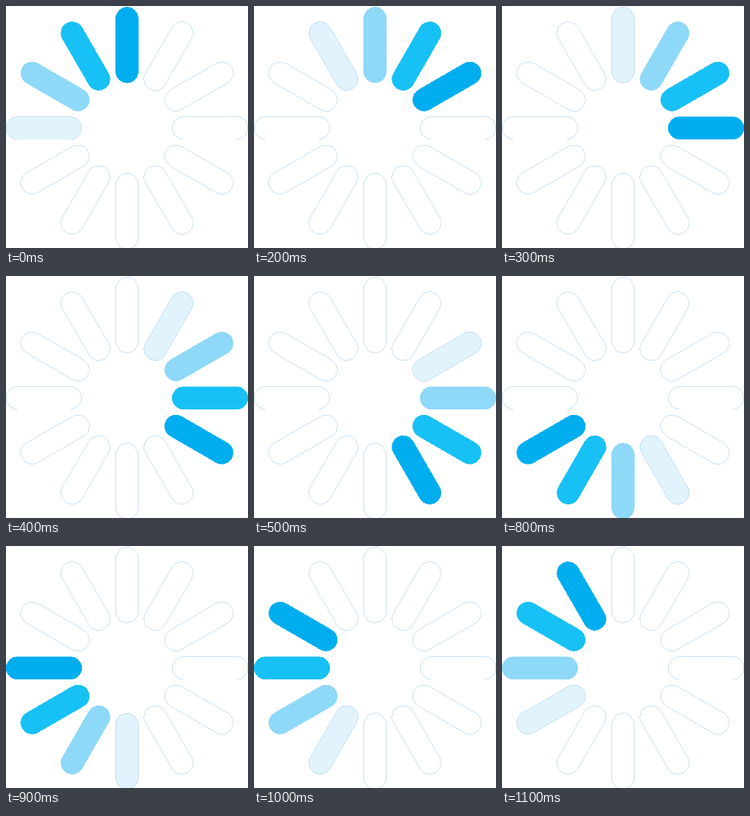
Write an HTML page that moves like this. It is 303 px wide and 303 px high and loops after 1200 ms.

```html
<!DOCTYPE html>
<html lang="en">
<head>
<meta charset="utf-8">
<title>Spinner</title>
<style>
  html, body { margin: 0; width: 100%; height: 100%; overflow: hidden; background: #fff; }
  svg { display: block; width: 100vw; height: 100vh; }
</style>
</head>
<body>
<svg viewBox="0 0 303 303" shape-rendering="crispEdges">
  <g id="spokes" transform="translate(151.5 152.75)" stroke-width="0.5"></g>
</svg>
<script>
  const COUNT = 12, STEP = 100;
  const RADIUS = 14.2, INNER = 70.8, OUTER = 137.2;
  const OUTLINE = "#9cc8ec";
  const TRAIL = ["#00aeef", "#17c1f5", "#8ed8f8", "#e1f4fd"];
  const group = document.getElementById("spokes");

  function makeSpoke(_, i) {
    const angle = i * 360 / COUNT - 90;
    const horizontal = angle % 180 === 0;
    const path = document.createElementNS("http://www.w3.org/2000/svg", "path");
    const arc = `A${RADIUS} ${RADIUS} 0 0 1`;
    // Horizontal spokes have no line along their lower edge.
    path.setAttribute("d",
      `M${INNER} ${RADIUS}${arc} ${INNER} ${-RADIUS}H${OUTER}${arc} ${OUTER} ${RADIUS}` +
      (horizontal ? "" : "Z"));
    path.setAttribute("transform", angle === 180 ? "scale(-1 1)" : `rotate(${angle})`);
    group.append(path);
    return path;
  }

  const spokes = Array.from({ length: COUNT }, makeSpoke);

  function render(time) {
    const head = Math.floor(time / STEP) % COUNT;
    spokes.forEach((spoke, i) => {
      const age = (head - i + COUNT) % COUNT;
      spoke.setAttribute("fill", TRAIL[age] || "#fff");
      // Only the palest and the empty spokes show an outline.
      spoke.setAttribute("stroke", age < 3 ? TRAIL[age] : OUTLINE);
    });
  }

  const start = performance.now();
  function tick() {
    render(performance.now() - start);
    requestAnimationFrame(tick);
  }
  tick();
</script>
</body>
</html>
```
